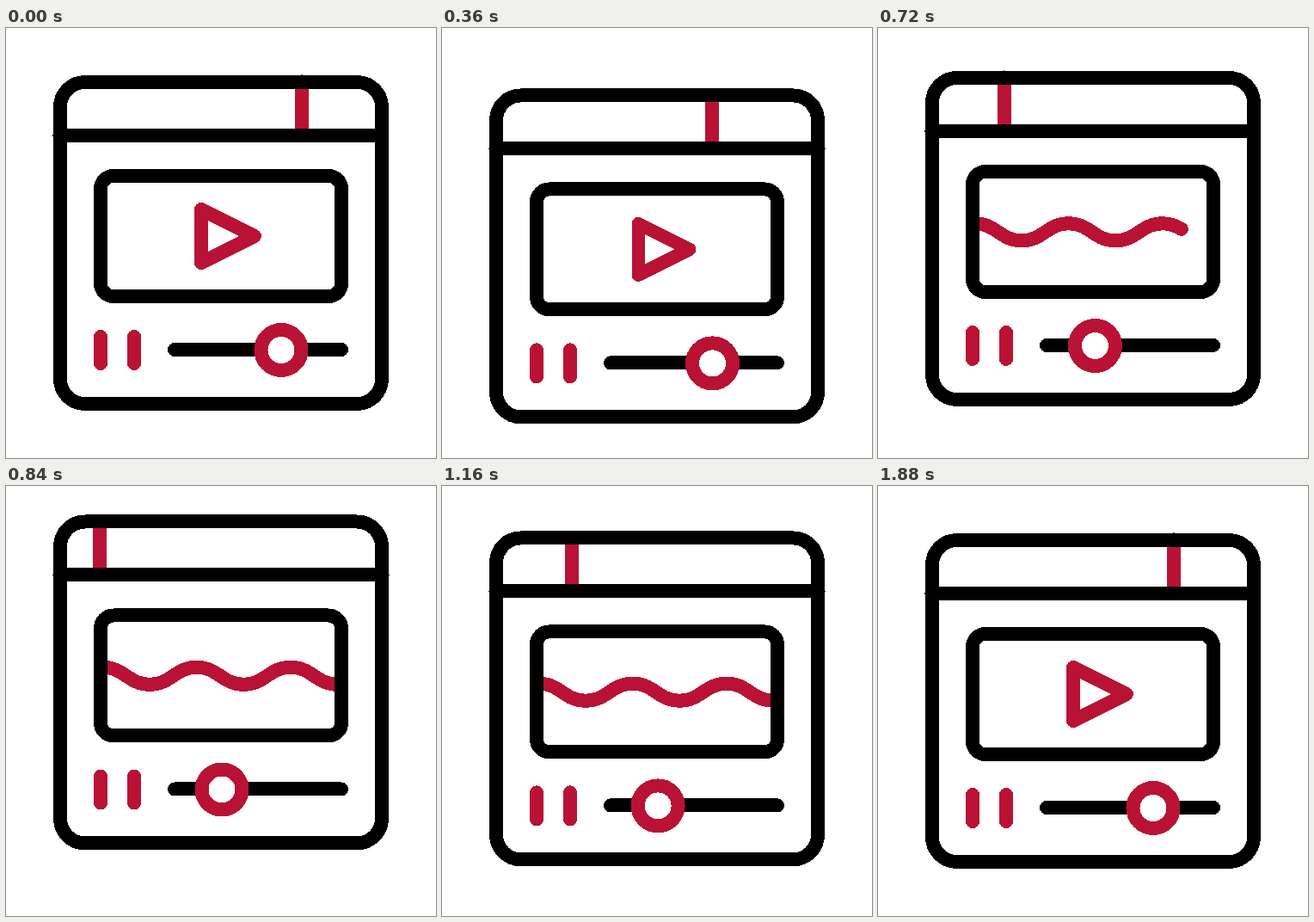
Recreate the animation shown at these times as an HTML page. Size 500 px wide and 500 px high, loop 2 s.

```html
<!DOCTYPE html>
<html lang="en">
<head>
<meta charset="utf-8">
<title>Video player icon</title>
<style>
  html, body { margin: 0; width: 100%; height: 100%; overflow: hidden; background: #fff; }
  svg { display: block; width: 100vw; height: 100vh; }
  .ink, .red { fill: none; stroke-width: 16; stroke-linecap: round; stroke-linejoin: round; }
  .ink { stroke: #000; }
  .red { stroke: #b91234; }
</style>
</head>
<body>
<svg viewBox="0 0 500 500" shape-rendering="crispEdges">
  <g id="player">
    <path id="tab" class="red" d="M0 62.4V125"/>
    <rect class="ink" x="63" y="63" width="374" height="374" rx="29"/>
    <path class="ink" d="M62.4 125H437.6"/>
    <path id="wave" class="red" pathLength="1"/>
    <path id="play" class="red" d="M-31 -31L31 0L-31 31Z"/>
    <rect class="ink" x="110" y="172" width="280" height="140" rx="15"/>
    <path id="bars" class="red"/>
    <path class="ink" d="M196 374H390"/>
    <circle id="knob" class="red" cy="374.5" r="23.5" style="fill:#fff"/>
  </g>
</svg>
<script>
const LOOP = 2000, STEP = 40;
const part = Object.fromEntries(
  [...document.querySelectorAll('[id]')].map(el => [el.id, el]));

// Each track is a list of [time, value] keys, eased in and out between keys.
const tracks = {
  lift:  [[155, 0], [510, 25], [865, -22.2], [1240, 0]],
  tab:   [[201, 344], [922, 100], [923, 100], [1725, 344]],
  knob:  [[276, 320], [762, 251], [1150, 251], [1630, 320]],
  play:  [[333, 1], [560, 0], [1660, 0], [1880, 1]],
  head:  [[433, 0], [800, 1]],
  tail:  [[1312, 0], [1812, 1]],
  bar:   [[1220, 15.5], [1430, 10], [1640, 15.5]]
};

function valueAt(keys, t) {
  if (t <= keys[0][0]) return keys[0][1];
  for (let i = 1; i < keys.length; i++) {
    const [t0, v0] = keys[i - 1], [t1, v1] = keys[i];
    if (t < t1) {
      const s = (t - t0) / (t1 - t0);
      return v0 + (v1 - v0) * s * s * (3 - 2 * s);
    }
  }
  return keys[keys.length - 1][1];
}

function wavePath() {
  const half = 54.6, handle = 25;
  let d = 'M112.5 232.3';
  for (let i = 0; i < 5; i++) {
    const dy = i % 2 ? -20 : 20;
    d += `c${handle} 0 ${half - handle} ${dy} ${half} ${dy}`;
  }
  return d;
}

const show = (el, visible) => el.setAttribute('visibility', visible ? 'visible' : 'hidden');

function draw(t) {
  const at = name => valueAt(tracks[name], t);
  const scale = at('play'), head = at('head'), tail = at('tail'), bar = at('bar');

  part.player.setAttribute('transform', `translate(0 ${at('lift')})`);
  part.tab.setAttribute('transform', `translate(${at('tab')} 0)`);
  part.knob.setAttribute('cx', at('knob'));
  part.bars.setAttribute('d',
    [110, 149].map(x => `M${x} ${374.5 - bar}v${2 * bar}`).join(''));

  show(part.play, scale > 0);
  part.play.setAttribute('transform', `translate(258 242) scale(${scale})`);

  show(part.wave, head > tail);
  part.wave.setAttribute('stroke-dasharray', `${Math.max(0, head - tail)} 2`);
  part.wave.setAttribute('stroke-dashoffset', -tail);
}

part.wave.setAttribute('d', wavePath());
const start = performance.now();

function tick() {
  const t = (performance.now() - start) % LOOP;
  draw(Math.floor(t / STEP) * STEP);
  requestAnimationFrame(tick);
}
tick();
</script>
</body>
</html>
```
